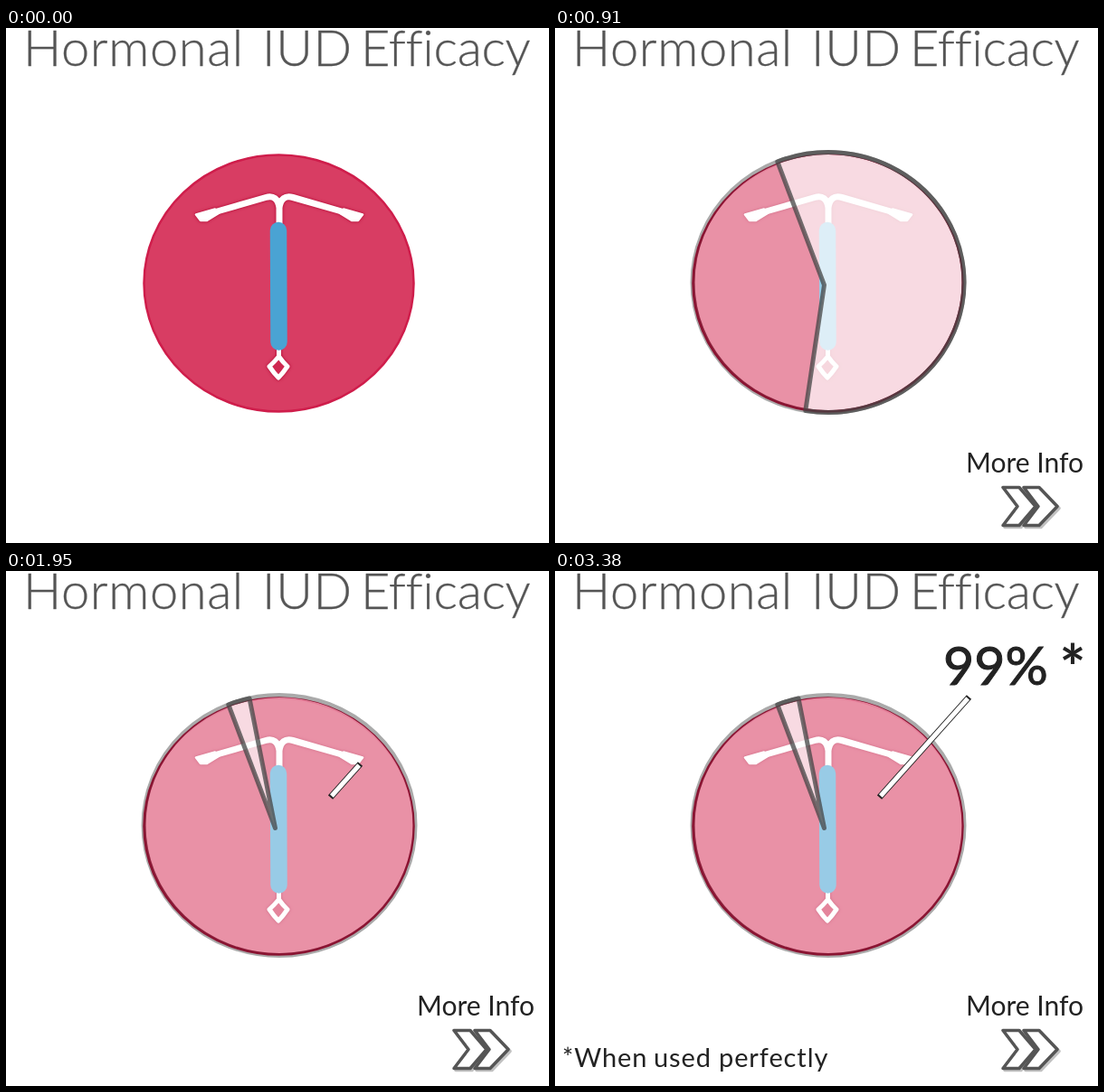
These frames come from a looping animation (600x570 px, 7020 ms). An HTML page:

```html
<!DOCTYPE html>
<html lang="en">
<head>
<meta charset="utf-8">
<title>Hormonal IUD Efficacy</title>
<style>
  html, body { margin: 0; width: 100%; height: 100%; overflow: hidden; background: #fff; }
  svg { display: block; width: 600px; height: 570px; }
  text { font-family: Lato, "Open Sans", sans-serif; fill: #222; }
  .title text { font-size: 56px; font-weight: 300; fill: #555; stroke: #555; stroke-width: .3px; letter-spacing: .6px; }
  .note text { font-size: 29px; letter-spacing: .9px; }
  .device { filter: drop-shadow(0 0 1.5px #b8173f) drop-shadow(0 0 1px #c8204a); }
  #ring { mix-blend-mode: multiply; }
</style>
</head>
<body>
<svg viewBox="0 0 600 570">
  <g class="title">
    <text x="19" y="42">Hormonal</text>
    <text x="283" y="42">IUD</text>
    <text x="392" y="42" style="letter-spacing:-.3px">Efficacy</text>
  </g>

  <ellipse cx="301.5" cy="282.5" rx="149" ry="142" fill="#d83d63" stroke="#cf1d4b" stroke-width="2.5"/>
  <g class="device" fill="none" stroke="#fff" stroke-linejoin="round">
    <path d="M228 204.500L287 187.500Q300 184 302 199Q304 184 317 187.500L376 204.500M302 196V218" stroke-width="7"/>
    <path d="M210 206.500L231 200.500L235 205L222 213H215ZM394 206.500L373 200.500L369 205L382 213H389Z" fill="#fff" stroke-width="2.5"/>
    <path d="M301.500 355V363.500Q306 370 311 374.500Q306 382 301 387Q296 382 291 374.500Q296 370 301.500 363.500" fill="#cf2850" stroke-width="5"/>
  </g>
  <path d="M301 224L301.500 347.500" stroke="#4aa3d3" stroke-width="18.500" stroke-linecap="round"/>

  <g id="pie" stroke-linejoin="round">
    <path id="covered" fill="#fff" fill-opacity=".43"/>
    <path id="rest" fill="#fff" fill-opacity=".81"/>
    <ellipse id="ring" fill="none" stroke="#aaa" stroke-width="5"/>
    <path id="edge" fill="none" stroke="#444" stroke-opacity=".75" stroke-width="5"/>
  </g>

  <text id="more" x="-1" y="10" font-size="30">More Info</text>
  <g id="arrows" stroke-linejoin="round" stroke-width="3.500">
    <g fill="#999" stroke="#999" opacity=".6" transform="translate(2 2)">
      <path d="M-30-21H-12L6 0L-12 21H-30L-14 0Z"/>
      <path d="M-7-21H10L30 0L10 21H-7L9 0Z"/>
    </g>
    <g fill="#fff" stroke="#555">
      <path d="M-30-21H-12L6 0L-12 21H-30L-14 0Z"/>
      <path d="M-7-21H10L30 0L10 21H-7L9 0Z"/>
    </g>
  </g>

  <g id="pointer">
    <path id="barEdge" stroke="#222" stroke-width="7"/>
    <path id="barFill" stroke="#fff" stroke-width="5"/>
  </g>
  <text id="percent" x="429" y="126" font-size="59" stroke="#222" stroke-width="1">99%</text>
  <text id="star" x="572" y="132" font-size="68" font-weight="700" text-anchor="middle">*</text>
  <g id="note" class="note">
    <text x="8" y="549">*When</text>
    <text x="109" y="549">used</text>
    <text x="181" y="549">perfectly</text>
  </g>
</svg>
<script>
const LOOP = 7020, STEP = 130, START = -22;
const el = id => document.getElementById(id);
const set = (id, attrs) => { for (const k in attrs) el(id).setAttribute(k, attrs[k]); };
const show = (id, on) => { el(id).style.visibility = on ? 'visible' : 'hidden'; };

// Linear keyframes: each row is [time, value, value, ...]
function key(t, rows) {
  let i = 0;
  while (i < rows.length - 2 && t >= rows[i + 1][0]) i++;
  const a = rows[i], b = rows[i + 1];
  const p = Math.min(1, Math.max(0, (t - a[0]) / (b[0] - a[0])));
  return a.slice(1).map((v, j) => v + (b[j + 1] - v) * p);
}

// cx, cy, rx, ry of the pie, then the point where its two edges meet
const SHAPE = [
  [390, 298, 277, 10, 10, 297, 276],
  [520, 298, 278, 47, 47, 293, 274],
  [780, 302, 282, 123, 121, 294, 281],
  [910, 302, 281.5, 150, 144, 297.5, 284.5]
];
const SWEEP = [[390, 6], [520, 28], [780, 101], [1170, 243], [1430, 321], [1560, 339], [1690, 350.7]];
const TEXT_SCALE = [[130, .4], [260, .8], [390, 1.04], [520, .955], [650, 1]];
const ARROW_SCALE = [[130, .3], [260, .7], [390, 1.25], [520, .97], [650, 1]];

function drawPie(t) {
  const [cx, cy, rx, ry, ax, ay] = key(t, SHAPE);
  const [sweep] = key(t, SWEEP);
  function sector(from, to, inset) {
    const w = rx - inset, h = ry - inset;
    const point = deg => {
      const a = deg * Math.PI / 180;
      return `${cx + w * Math.sin(a)} ${cy - h * Math.cos(a)}`;
    };
    return `M${ax} ${ay}L${point(from)}A${w} ${h} 0 ${+(to - from > 180)} 1 ${point(to)}Z`;
  }
  const end = START + 360 - sweep;
  // The fills stop at the inner side of the ring
  set('covered', { d: sector(START - sweep, START, 2.5) });
  set('rest', { d: sector(START, end, 2.5) });
  set('edge', { d: sector(START, end, 0) });
  set('ring', { cx, cy, rx, ry });
}

function drawPointer(t) {
  const p = Math.min(1, (t - 1950 + STEP) / (3 * STEP));
  const dx = 99 * p, dy = -111 * p;
  const inset = 2 / Math.hypot(dx, dy);
  const line = k => `M${358.5 + dx * k} ${250.5 + dy * k}L${358.5 + dx * (1 - k)} ${250.5 + dy * (1 - k)}`;
  set('barEdge', { d: line(0) });
  set('barFill', { d: line(inset) });
}

function draw(now) {
  const t = Math.floor(now % LOOP / STEP) * STEP;
  show('pie', t >= 390);
  show('more', t >= 130);
  show('arrows', t >= 130);
  show('pointer', t >= 1950);
  show('percent', t >= 2340);
  show('star', t >= 2860);
  show('note', t >= 3380);
  drawPie(t);
  set('more', { transform: `translate(455 482) scale(${key(t, TEXT_SCALE)})` });
  set('arrows', { transform: `translate(525 529.5) scale(${key(t, ARROW_SCALE)})` });
  if (t >= 1950) drawPointer(t);
}

const begin = performance.now();
function tick() {
  draw(performance.now() - begin);
  requestAnimationFrame(tick);
}
tick();
</script>
</body>
</html>
```
